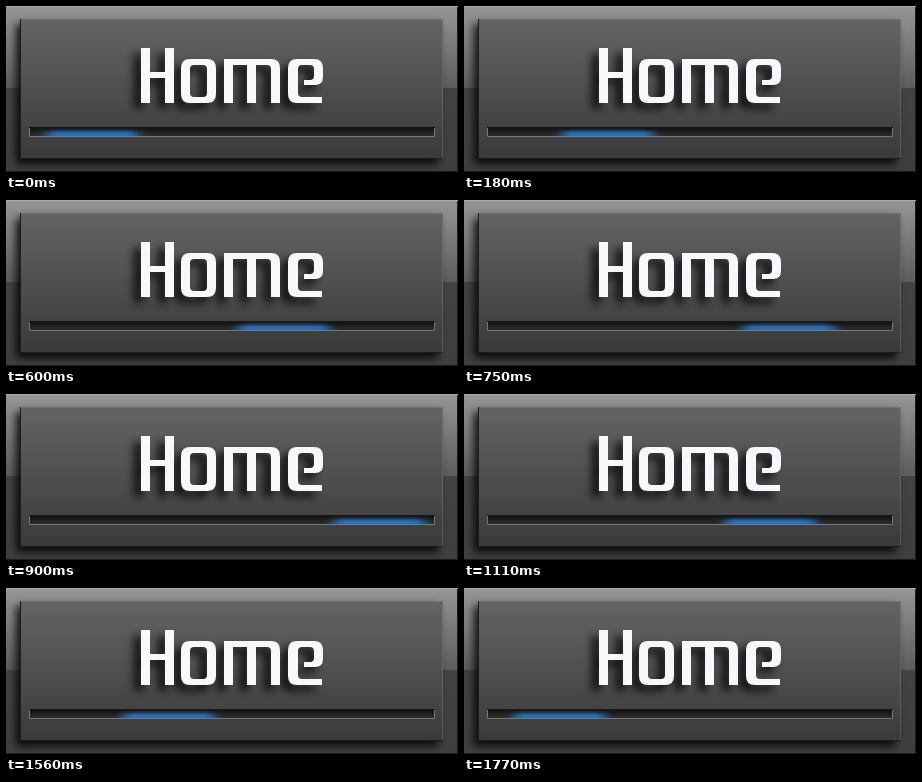
Animation of 452 by 166 pixels, one loop 1.8 s. Source, as an HTML page:

```html
<!DOCTYPE html>
<html lang="en">
<head>
<meta charset="utf-8">
<title>Home</title>
<style>
  html, body { margin: 0; width: 100%; height: 100%; overflow: hidden; background: #3a3a3a; }
  svg { display: block; }
</style>
</head>
<body>
<svg width="452" height="166" viewBox="0 0 452 166" role="img" aria-label="Home">
  <defs>
    <linearGradient id="frame" x2="0" y2="1">
      <stop stop-color="#969696"/>
      <stop offset=".494" stop-color="#5c5c5c"/>
      <stop offset=".494" stop-color="#434343"/>
      <stop offset="1" stop-color="#3e3e3e"/>
    </linearGradient>
    <linearGradient id="panel" x2="0" y2="1">
      <stop stop-color="#666462"/>
      <stop offset="1" stop-color="#3a3a3a"/>
    </linearGradient>
    <linearGradient id="groove" x2="0" y2="1">
      <stop stop-color="#171717"/>
      <stop offset="1" stop-color="#2d2d2d"/>
    </linearGradient>
    <linearGradient id="shade" x2="0" y2="1">
      <stop stop-color="#111" stop-opacity=".7"/>
      <stop offset=".6" stop-color="#111" stop-opacity="0"/>
    </linearGradient>
    <filter id="soft" x="-20%" y="-20%" width="140%" height="140%">
      <feGaussianBlur stdDeviation="4"/>
    </filter>
    <filter id="halo" x="-30%" y="-60%" width="160%" height="220%">
      <feGaussianBlur stdDeviation="6 2"/>
    </filter>
    <clipPath id="slot"><rect x="24" y="122" width="404" height="8"/></clipPath>
    <g id="word" fill-rule="evenodd">
      <path d="M135 42h9v24h15v-24h9v55h-9v-25h-15v25h-9z"/>
      <path d="M184 53h17q9 0 9 9v26q0 9-9 9h-17q-9 0-9-9v-26q0-9 9-9zM188 59q-4 0-4 4v24q0 4 4 4h9q4 0 4-4v-24q0-4-4-4z"/>
      <path d="M218 53h47q9 0 9 9v35h-9v-34q0-4-4-4h-11v38h-9v-38h-14v38h-9z"/>
      <path d="M291 53h17q9 0 9 9v9q0 8-8 8h-11v-5h6q4 0 4-4v-7q0-4-4-4h-8q-4 0-4 4v24q0 4 4 4h20v6h-25q-9 0-9-9v-26q0-9 9-9z"/>
    </g>
  </defs>

  <rect width="452" height="166" fill="url(#frame)"/>
  <path d="M0 .5h452" stroke="#aaa"/>
  <path d="M451.500 1v164.500h-452" fill="none" stroke="#1c1c1c"/>
  <rect x="10" y="18" width="422" height="140" opacity=".85" filter="url(#soft)"/>

  <rect x="15" y="13" width="422" height="139" fill="url(#panel)"/>
  <path d="M14.500 13v139.500h422" fill="none" stroke="#1c1c1c"/>
  <path d="M15 13.500h421.500v138.500" fill="none" stroke="#858585" opacity=".4"/>

  <use href="#word" x="-7" y="6" opacity=".8" filter="url(#soft)"/>
  <use href="#word" fill="#f8f8fc"/>

  <rect x="23" y="121" width="406" height="10" fill="url(#groove)"/>
  <g clip-path="url(#slot)">
    <rect id="glow" y="124" width="92" height="14" rx="6" fill="#1b73cb" filter="url(#halo)"/>
    <rect x="24" y="122" width="404" height="8" fill="url(#shade)"/>
  </g>
  <path d="M23 121.500h406" stroke="#161616"/>
  <path d="M23.500 122v8.500h405v-8.500" fill="none" stroke="#777"/>
</svg>
<script>
  const glow = document.getElementById('glow');
  const STEP = 30, HALF = 30, LEFT = 86, RIGHT = 373, WIDTH = 92;

  // The light sweeps right and back at constant speed, in 30 ms steps.
  function draw(now) {
    const i = Math.floor(now / STEP) % (2 * HALF);
    const p = 1 - Math.abs(i - HALF) / HALF;
    glow.setAttribute('x', LEFT + (RIGHT - LEFT) * p - WIDTH / 2);
  }

  const start = performance.now();
  function tick() {
    draw(performance.now() - start);
    requestAnimationFrame(tick);
  }
  tick();
</script>
</body>
</html>
```
